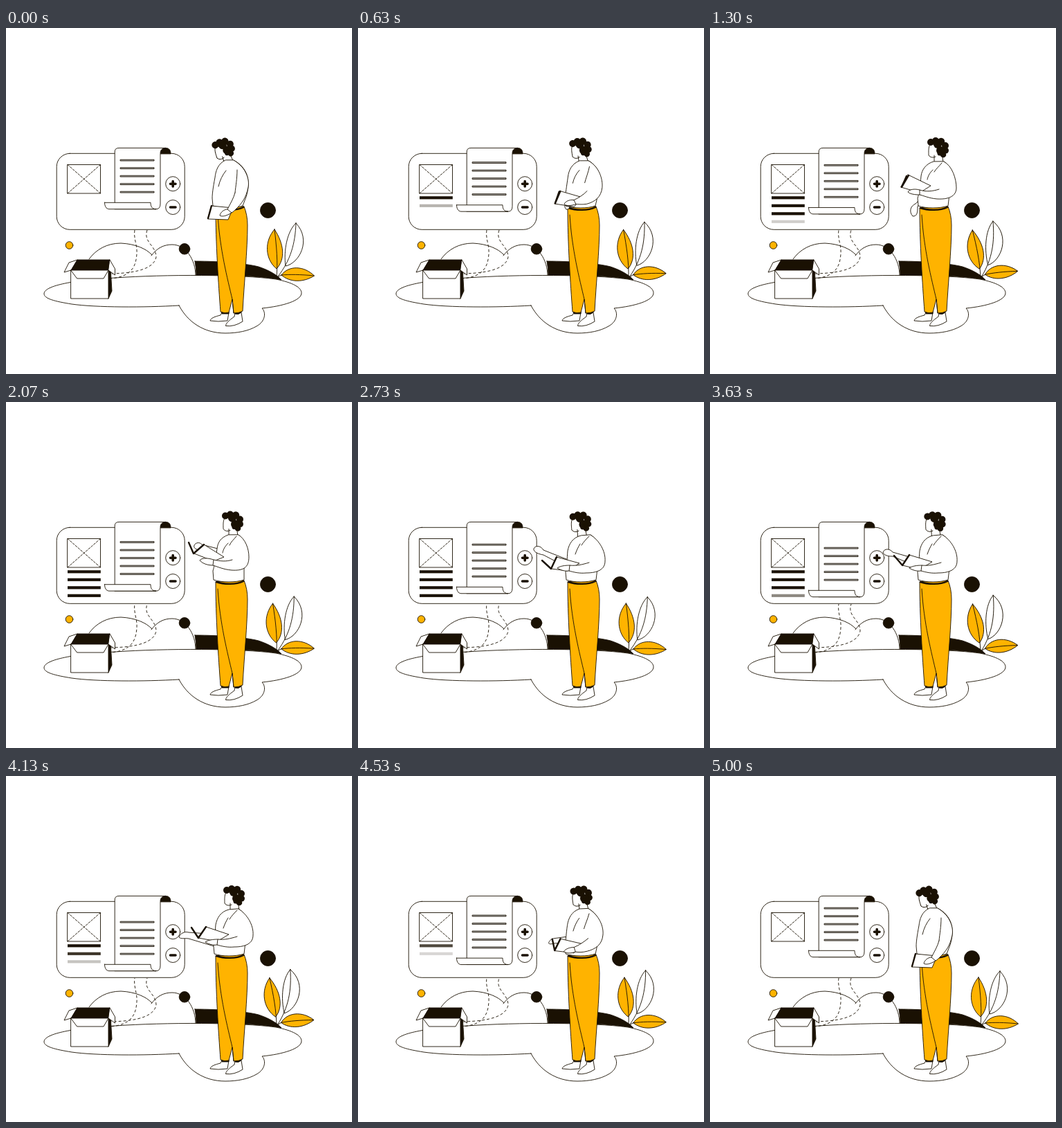
These frames come from a looping animation (500x500 px, 5.03 s). An HTML page:

```html
<!DOCTYPE html>
<html lang="en">
<head>
<meta charset="utf-8">
<title>Order illustration</title>
<style>
  html, body { margin: 0; width: 100%; height: 100%; overflow: hidden; background: #fff; }
  svg { display: block; width: 100%; height: 100%; }
  .ln { fill: #fff; stroke: #1a1103; stroke-width: .9; stroke-linejoin: round; stroke-linecap: round; }
  .open { fill: none; }
  .dark { fill: #1a1103; }
  .gold { fill: #ffb300; }
  .dash { fill: none; stroke-linecap: butt; stroke-dasharray: 4 3; }
  .thick { fill: none; stroke-width: 2.4; }
</style>
</head>
<body>
<svg viewBox="0 0 500 500">
  <g class="ln">
    <path d="M120 334C130 320 146 311 166 311C187 312 203 319 211 329L211 370H120" stroke="none"/>
    <path class="open" d="M120 334C130 320 146 311 166 311C187 312 203 319 211 328"/>
    <path d="M210 329C218 318 228 313 240 313C260 313 274 335 274 358"/>
    <path class="dark" d="M273 337C310 337 345 340 365 345C380 350 392 357 398 364C360 357 310 357 275 358Q275 347 273 337Z"/>
    <path d="M250 401C200 404 130 404 95 399C70 395 55 391 55 384C55 372 100 364 158 361C230 356 340 356 390 363C415 368 427 375 427 383C427 394 400 402 370 405C376 411 375 424 362 431C350 438 334 441 317 441C285 441 262 424 250 401Z"/>
    <path class="dash" d="M186 292C184 304 190 314 189 326C188 344 182 359 152 362"/>
    <path class="dash" d="M204 292C198 310 217 314 217 331C214 346 194 354 152 355"/>
    <circle class="gold" cx="91.5" cy="314" r="5.3"/>
    <circle class="dark" cx="258" cy="319.3" r="7.8"/>
    <circle class="dark" cx="378.5" cy="263.5" r="11"/>
  </g>

  <g class="ln">
    <path d="M103 335L91 339L84 353L94 350Z"/>
    <path class="dark" d="M94 350L103 335H150L148 350Z"/>
    <path class="dark" d="M148 391L153 380L151 346L147 350Z"/>
    <path d="M94 350H148V391H94Z"/>
    <path d="M94 350H148L141 362H103Z"/>
    <path d="M150 335L157.500 348V357L148 350Z"/>
  </g>

  <g class="ln">
    <rect x="73.200" y="181.300" width="185" height="110" rx="19"/>
    <rect x="89" y="197.500" width="47.500" height="41.500"/>
    <path class="open" stroke-dasharray="3 2" d="M89 197.500L136.500 239M136.500 197.500L89 239"/>
    <g id="bars" stroke="none" class="dark"></g>
    <path class="dark" d="M222 181.500C222 176 226 173.400 231 173.400C236 173.400 238 177 238 181.500Z"/>
    <path id="sheet"/>
    <g id="roll">
      <g id="rows"></g>
      <path d="M142.500 252.300H209C209 258 211 261.700 217 261.700H149C144.500 261.500 142.500 257 142.500 252.300Z"/>
    </g>
    <circle cx="241.200" cy="225.200" r="10.500"/>
    <circle cx="241.200" cy="259" r="10.500"/>
    <path style="stroke-width:3.6" d="M237.500 225.200H245M241.200 221.500V229M237.500 259H245"/>
  </g>

  <g id="plant" class="ln">
    <path d="M419 282C406 294 401 322 404 344C424 340 442 306 419 282Z"/>
    <path class="open" d="M419 282C418 312 411 336 393 359"/>
    <path class="gold" d="M388 291C373 308 374 334 391 348C404 334 402 312 388 291Z"/>
    <path class="open" d="M388 291C391 316 393 338 391 360"/>
    <path class="gold" d="M398 357C408 343 430 343 445.500 358C430 368 410 368 398 357Z"/>
    <path class="open" d="M445 358C425 356 410 356 398 357L392 360"/>
  </g>

  <g class="ln">
    <path d="M312 411L310 415C302 417 296 419 295 423Q306 425 320 423L322 411Z"/>
    <path d="M331 411L330 417C322 423 318 426 317.500 430.500Q330 432 342 424L340 411Z"/>
    <path class="dark" d="M311 409L312 413L322 413V409ZM331 409V413Q336 415 340 411V408Z"/>
    <path class="gold" d="M303 260C303 310 307 370 310 410Q316 413 322 411L327 392L329 412Q337 412 342 409C344 370 349 320 349 285Q349 270 344 258Z"/>
    <path class="open" d="M306 270C309 320 320 362 327 392L329 412"/>
    <path class="thick" d="M304 260C315 264 333 264 343 259"/>
    <path id="far"/>
    <g id="head">
      <path d="M324 184V195H337L335 178L320 166C315 170 316 178 316 184Q320 189 326 186"/>
      <g id="hair" class="dark" stroke="none"></g>
    </g>
    <path id="torso"/>
    <path id="book"/>
    <path id="cover" class="thick"/>
    <path id="palm"/>
    <path id="arm"/>
    <path id="crease" class="open"/>
  </g>
</svg>
<script>
const LOOP = 5030;
const TIMES = [0, 1300, 2070, 2730, 3630, 4130, 5000, LOOP];
const BODY = [0, 1, 2, 3, 3, 3, 0, 0];   // rest, hold, read, point
const HANDS = [0, 1, 2, 3, 4, 5, 0, 0];
const $ = id => document.getElementById(id);

const body = {
  torso: [
    'M317 191C306 196 303 207 302 216C299 232 298 240 298 246L299 257C312 261 332 261 342 257L347 244C354 222 350 202 329 191Z',
    'M323 193C312 196 306 205 305 214C304 226 302 240 300 246L301 257C312 261 332 261 344 257L346 240C354 220 350 200 338 193Z',
    'M321 192C310 196 306 203 305 212C303 226 301 238 299 244L300 257C312 261 332 261 344 257L344 238C351 220 347 200 336 192Z',
    'M322 193C310 196 305 205 303 215C302 226 302 238 300 246L301 257C312 261 332 261 344 257L346 240C356 220 350 200 336 192Z'
  ],
  arm: [
    'M329 191C348 202 352 220 350 230C347 246 340 254 333 261C330 264 328 266 326 267L320 262C324 254 329 246 331 238',
    'M338 193C350 199 356 218 356 231C356 243 345 248 328 247C316 246 308 242 303 241L303 234C312 237 322 236 331 233',
    'M336 192C346 198 351 212 351 224C351 240 342 244 326 243C314 242 306 238 299 236L300 228C310 230 318 231 327 228',
    'M336 192C349 200 358 216 357 230C357 242 346 247 330 247C320 248 312 246 305 244L306 236C316 237 324 235 334 232'
  ],
  palm: [
    'M326 267C318 272 312 273 309 271C310 266 315 262 320 262',
    'M303 241C296 241 289 240 286 237C288 233 296 232 303 234',
    'M299 236C290 236 284 233 280 229C282 225 292 225 300 228',
    'M305 244C299 245 293 243 288 240C292 237 299 236 306 236'
  ],
  crease: [
    'M318 206C313 212 309 220 307 229M334 205C334 218 332 228 331 238',
    'M322 205C317 210 315 214 314 219M335 195C331 200 327 203 324 208',
    'M321 204C316 209 314 213 313 218M333 194C329 199 325 202 323 207',
    'M321 205C318 210 316 214 314 220M334 194C330 198 326 202 323 207'
  ]
};

const hands = {
  far: [
    'M306 235L306 246C306 250 307 252 308 253C310 254 312 252 313 250L313 240',
    'M303 248L297 254C290 257 287 265 293 272C299 272 300 268 300 258L304 252',
    'M306 212L283 206C280 202 274 203 272 207C270 212 278 215 284 214L306 228',
    'M306 229L268 214C264 207 256 207 254 212C253 217 262 220 268 221L304 240',
    'M306 229L264 217C259 211 252 212 250 217C251 222 258 223 264 223L304 240',
    'M306 229L264 226C258 224 251 228 250 233C253 236 258 234 264 235L304 247'
  ],
  book: [
    'M297 257L328 260L321 277L292 276Z',
    'M286 212L319 228L303 238L276 230Z',
    'M286 206L315 224L300 230L272 219Z',
    'M287 224L320 233L303 244L279 241Z',
    'M288 221L321 231L303 242L278 236Z',
    'M289 218L322 229L305 239L278 234Z'
  ],
  cover: [
    'M297 257L292 275L297 257',
    'M284 214L277 230L287 213',
    'M264 203L271 219L286 206',
    'M266 229L279 241L287 224',
    'M266 222L278 236L288 221',
    'M268 219L278 234L289 218'
  ],
  head: [
    'translate(-11 0) rotate(-17 330 186)',
    'translate(0 0) rotate(0 330 186)',
    'translate(-2 -0.5) rotate(0 330 186)',
    'translate(-7 0) rotate(-4 330 186)',
    'translate(-4 0) rotate(-2 330 186)',
    'translate(0 0) rotate(0 330 186)'
  ]
};

const NUM = /-?\d+(\.\d+)?/g;
function mix(a, b, k) {
  const to = b.match(NUM);
  let i = 0;
  return a.replace(NUM, n => (+n + (to[i++] - n) * k).toFixed(2));
}
const clamp = x => Math.min(1, Math.max(0, x));
const smooth = x => x * x * (3 - 2 * x);

function addShape(parent, tag, attrs) {
  const el = document.createElementNS('http://www.w3.org/2000/svg', tag);
  for (const key in attrs) el.setAttribute(key, attrs[key]);
  $(parent).append(el);
  return el;
}

const bars = [0, 1, 2, 3].map(i =>
  addShape('bars', 'rect', { x: 89, y: 243.2 + i * 11.5, width: 47.8, height: 4.2 }));
for (let i = 0; i < 5; i++) {
  addShape('rows', 'rect', { x: 165.5, y: 190.2 + i * 11.5, width: 48.5, height: 1.8, fill: '#bbb' });
}
for (const [cx, cy, r] of [[319, 165, 5], [326, 163, 5], [334, 164, 5.2], [340, 170, 5],
  [340.5, 177, 4.5], [337, 183, 4.3], [333, 177, 6], [329, 168, 6], [332, 181, 3.5]]) {
  addShape('hair', 'circle', { cx, cy, r });
}
const dashes = document.querySelectorAll('.dash');

function drawPose(set, poses, seg, k) {
  for (const id in set) {
    const steps = set[id];
    $(id).setAttribute(id === 'head' ? 'transform' : 'd',
      mix(steps[poses[seg]], steps[poses[seg + 1]], k));
  }
}

function draw(t) {
  let seg = 0;
  while (t >= TIMES[seg + 1]) seg++;
  const k = smooth((t - TIMES[seg]) / (TIMES[seg + 1] - TIMES[seg]));
  drawPose(body, BODY, seg, k);
  drawPose(hands, HANDS, seg, k);

  // the sheet unrolls steadily, waits, then rolls back
  const drop = 20 * Math.min(clamp(t / 3630), 1 - smooth(clamp((t - 4130) / 850)));
  $('roll').setAttribute('transform', `translate(0 ${drop})`);
  $('sheet').setAttribute('d', `M157.200 ${252.3 + drop}V179Q157.200 173.400 163 173.400H231
    C226 173.400 223 176 223 181.500V${254 + drop}Q223 ${261.7 + drop} 217 ${261.7 + drop}H157.200Z`);

  bars.forEach((bar, i) => {
    const show = clamp((t - 130 - i * 360) / 450);
    const hide = clamp((t - 4395 + i * 353) / 588);
    bar.setAttribute('opacity', Math.min(show, 1 - hide));
  });

  const sway = 3.6 * (Math.cos(4 * Math.PI * t / LOOP) - 1);
  $('plant').setAttribute('transform', `rotate(${sway} 392 361)`);
  dashes.forEach(el => { el.style.strokeDashoffset = -56 * t / LOOP; });
}

const start = performance.now();
function tick() {
  draw((performance.now() - start) % LOOP);
  requestAnimationFrame(tick);
}
tick();
</script>
</body>
</html>
```
